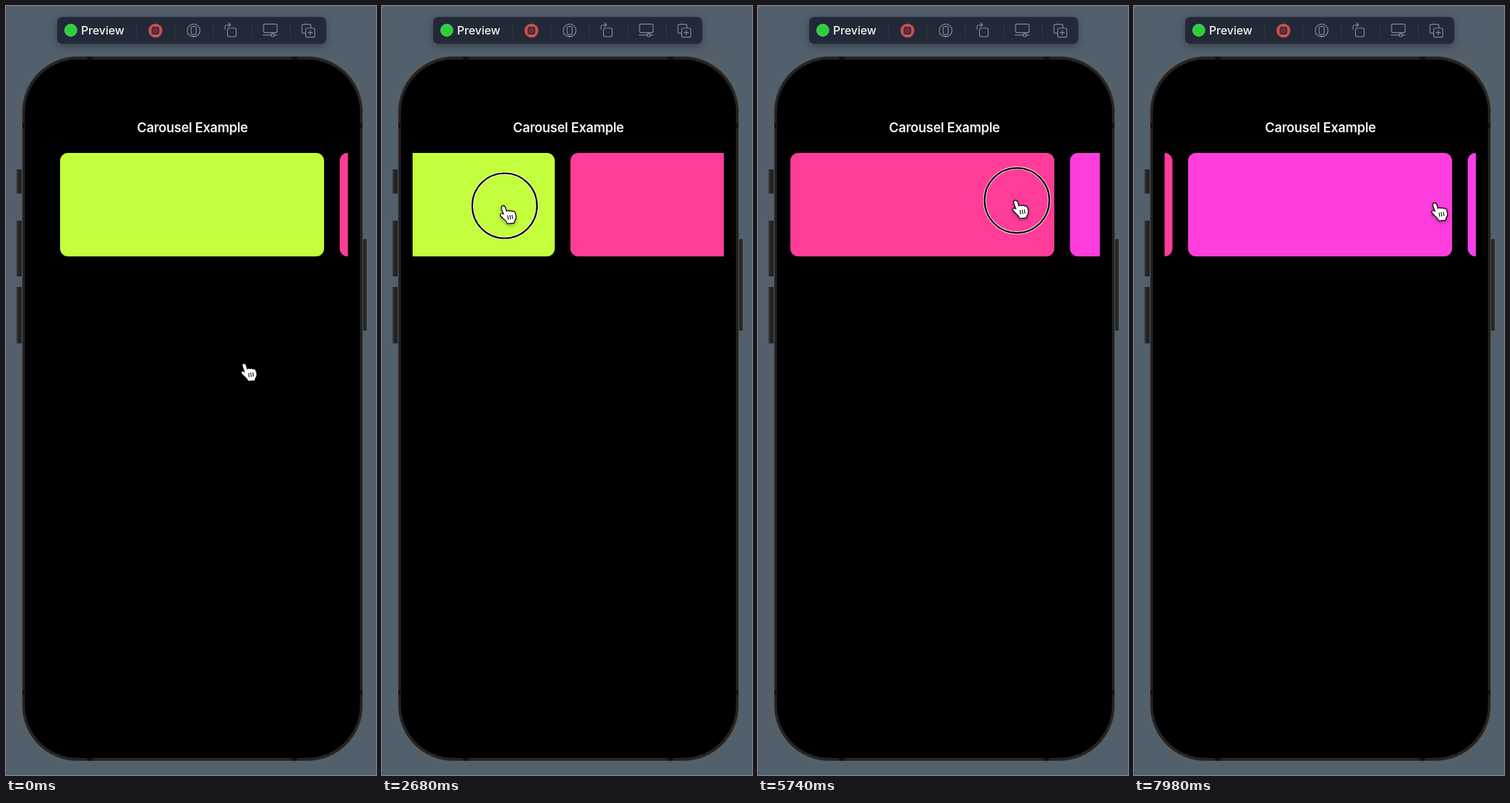
An HTML page with a canvas for the animation above (8000 ms loop, 520x1078 px).

```html
<!DOCTYPE html>
<html lang="en">
<head>
<meta charset="utf-8">
<title>Carousel Example</title>
<style>
  html, body { margin: 0; width: 100%; height: 100%; overflow: hidden; background: #52606c; }
  canvas { display: block; }
</style>
</head>
<body>
<canvas id="stage" width="520" height="1078"></canvas>
<script>
const ctx = document.getElementById('stage').getContext('2d');
const LOOP = 8000;
const CARD = { x: 76, y: 206, w: 371, h: 145, pitch: 393, radius: 11 };
const CARD_COLORS = ['#c3ff3d', '#ff3d98', '#ff3ddc', '#fa3fe8'];
const DRAG_SLOP = 12;

// Pointer path: time, x, y of the fingertip
const POINTER = [
  [0, 334, 502], [150, 334, 502], [800, 384, 289], [1000, 386, 284],
  [1750, 386, 284], [2680, 170, 281], [2850, 142, 281], [3050, 142, 281],
  [3700, 399, 273], [3900, 401, 273], [5160, 407, 273], [5450, 404, 273],
  [6280, 209, 276], [6450, 172, 277], [6650, 172, 277], [7500, 419, 277],
  [8000, 422, 277]
];
const DRAGS = [
  { press: 1500, release: 2850 },
  { press: 5450, release: 6450 }
];

const HAND = new Path2D(
  'M-1.6 2Q-1.6-.6.6-.5Q2.6-.3 3.3 2.4L4.8 7.6Q6.8 5.6 9 7Q11 5.6 13 7.4' +
  'Q16 6.6 17 9.6L18 14Q18.3 17.5 16 20L15.6 22.8L6.8 23.6Q5.6 20.3 2 17.4' +
  'Q-2.2 14.2-3 11.8Q-2.4 9.2.8 11.2L2 12Z');
const HAND_LINES = new Path2D('M6.8 12.5L7.8 18.5M9.8 12L10.8 18M12.8 11.7L13.8 17.5');

function slope(a, b, axis) {
  return (b[axis] - a[axis]) / (b[0] - a[0]);
}

// Tangent that never overshoots a hold or a turn
function tangent(i, axis) {
  if (i === 0 || i === POINTER.length - 1) return 0;
  const before = slope(POINTER[i - 1], POINTER[i], axis);
  const after = slope(POINTER[i], POINTER[i + 1], axis);
  return before * after <= 0 ? 0 : 2 * before * after / (before + after);
}

function pointerAt(t) {
  let i = 0;
  while (i < POINTER.length - 2 && POINTER[i + 1][0] <= t) i++;
  const a = POINTER[i], b = POINTER[i + 1], span = b[0] - a[0];
  const u = (t - a[0]) / span, u2 = u * u, u3 = u2 * u;
  const along = axis =>
    a[axis] * (2 * u3 - 3 * u2 + 1) + b[axis] * (3 * u2 - 2 * u3) +
    span * (tangent(i, axis) * (u3 - 2 * u2 + u) + tangent(i + 1, axis) * (u3 - u2));
  return { x: along(1), y: along(2) };
}

function dragOffset(drag, t) {
  const moved = pointerAt(t).x - pointerAt(drag.press).x;
  return Math.min(0, moved + DRAG_SLOP);
}

function scrollAt(t) {
  let scroll = 0;
  for (const drag of DRAGS) {
    if (t < drag.press) continue;
    if (t < drag.release) {
      scroll += dragOffset(drag, t);
    } else {
      const s = (t - drag.release) * 0.0125;
      const left = CARD.pitch + dragOffset(drag, drag.release);
      scroll += -CARD.pitch + left * (1 + s) * Math.exp(-s);
    }
  }
  return scroll;
}

function box(x, y, w, h, r, fill, stroke, width = 1) {
  ctx.beginPath();
  ctx.roundRect(x, y, w, h, r);
  paint(fill, stroke, width);
}

function disc(x, y, r, fill, stroke, width = 1) {
  ctx.beginPath();
  ctx.arc(x, y, r, 0, Math.PI * 2);
  paint(fill, stroke, width);
}

function paint(fill, stroke, width) {
  if (fill) { ctx.fillStyle = fill; ctx.fill(); }
  if (stroke) { ctx.strokeStyle = stroke; ctx.lineWidth = width; ctx.stroke(); }
}

function line(path, color, width = 1.2) {
  ctx.strokeStyle = color;
  ctx.lineWidth = width;
  ctx.stroke(new Path2D(path));
}

function label(text, x, y, font, align, spacing) {
  ctx.font = font;
  ctx.textAlign = align;
  ctx.letterSpacing = spacing;
  ctx.fillStyle = '#f5f5f5';
  ctx.fillText(text, x, y);
}

function drawToolbar() {
  const grey = '#858992', bar = '#232937';
  ctx.save();
  ctx.shadowColor = 'rgba(0,0,0,.35)';
  ctx.shadowBlur = 12;
  ctx.shadowOffsetY = 3;
  box(72, 15.5, 378, 37.5, 7, bar);
  ctx.restore();

  disc(91, 34, 8.5, '#2bd03d', '#55d765', 1);
  label('Preview', 105.5, 40, '500 16px Inter, sans-serif', 'left', '0px');
  for (let x = 183; x < 400; x += 54) line(`M${x}.5 23V45`, '#303544', 1);

  disc(210, 34.5, 9.8, '#c9504c');
  box(205.5, 30, 9, 9, 2, '#6a3038', bar, 1.5);

  disc(263.7, 34.3, 9, null, grey, 1.2);
  box(260.3, 28.6, 7, 11.5, 2, null, grey, 1.2);
  line('M262 42.5H265.5', grey);

  box(311.5, 31, 12, 12, 2, null, grey, 1.2);
  line('M307.8 33V30.5Q307.8 26.5 312 26.5H315M312.5 23.5L315.5 26.5L312.5 29.3', grey);

  box(362, 25.3, 19, 12, 2, null, grey, 1.2);
  line('M361 40.8H381.5', grey);
  disc(375, 40.8, 2.2, bar, grey, 1.2);

  box(416, 25.7, 12.5, 12.5, 2, null, grey, 1.2);
  box(421.3, 31, 12.7, 12.7, 2, bar, grey, 1.2);
  line('M427.6 34V40.7M424.3 37.4H431', grey);
}

function drawPhone() {
  const metal = '#242424';
  for (const [y, h] of [[229, 34], [301, 78], [394, 79]]) {
    box(15, y, 7, h, 1, metal);
    line(`M16 ${y + 1}V${y + h - 1}`, '#383a3b', 1);
  }
  box(501, 327, 6, 128, 1, metal);
  line('M506 328V454', '#3b3b3a', 1);

  box(22.5, 70.5, 479, 988, 78, metal, '#5a5347', 1);
  for (const x of [114, 401]) {
    box(x, 71, 8, 4, 0, '#121212');
    box(x, 1054, 8, 4, 0, '#121212');
  }
  for (const y of [164, 959]) {
    box(23, y, 3, 7, 0, '#121212');
    box(498, y, 3, 7, 0, '#121212');
  }
  box(26.5, 75, 471, 979, 74, '#000');
}

function drawCards(scroll) {
  ctx.save();
  ctx.beginPath();
  ctx.rect(43, CARD.y - 1, 437.5, CARD.h + 2);
  ctx.clip();
  CARD_COLORS.forEach((color, i) =>
    box(CARD.x + i * CARD.pitch + scroll, CARD.y, CARD.w, CARD.h, CARD.radius, color));
  ctx.restore();
}

function drawPointer(t) {
  const { x, y } = pointerAt(t);
  if (DRAGS.some(d => t >= d.press && t < d.release)) {
    disc(x + 2.5, y - 1, 45.5, null, 'rgba(255,255,255,.9)', 4);
    disc(x + 2.5, y - 1, 45.5, null, '#000', 2.2);
  }
  ctx.save();
  ctx.translate(x, y);
  ctx.lineJoin = 'round';
  ctx.shadowColor = 'rgba(0,0,0,.45)';
  ctx.shadowBlur = 4;
  ctx.shadowOffsetY = 2;
  ctx.strokeStyle = '#000';
  ctx.lineWidth = 2.4;
  ctx.stroke(HAND);
  ctx.shadowColor = 'transparent';
  ctx.fillStyle = '#fff';
  ctx.fill(HAND);
  ctx.lineWidth = 1.1;
  ctx.stroke(HAND_LINES);
  ctx.restore();
}

function draw(t) {
  ctx.fillStyle = '#52606c';
  ctx.fillRect(0, 0, 520, 1078);
  drawToolbar();
  drawPhone();
  label('Carousel Example', 262, 176.5, '600 18.5px Inter, sans-serif', 'center', '-0.3px');
  drawCards(scrollAt(t));
  drawPointer(t);
}

const start = performance.now();
function frame() {
  draw((performance.now() - start) % LOOP);
  requestAnimationFrame(frame);
}
frame();
</script>
</body>
</html>
```
